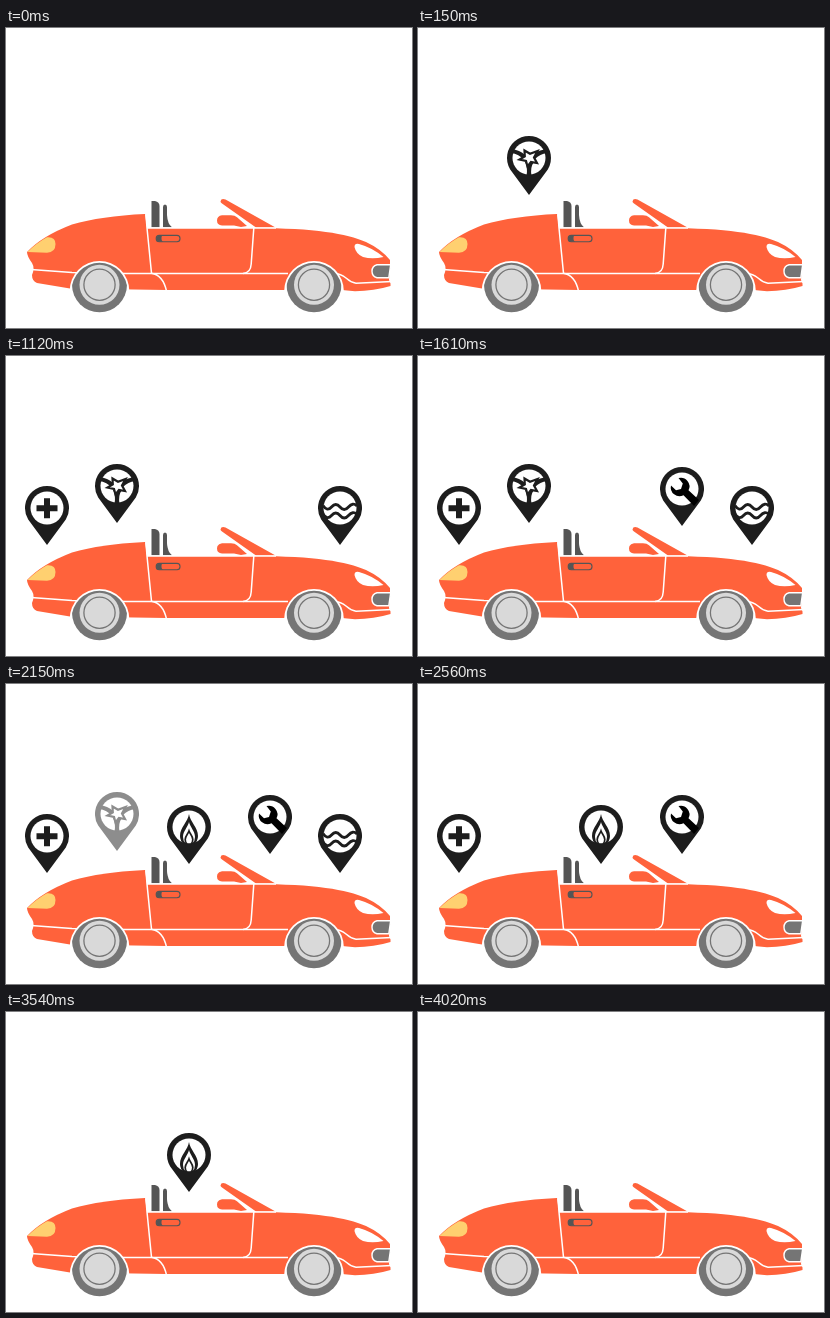
Write an HTML page that moves like this. It is 406x300 px and loops after 4320 ms.

```html
<!DOCTYPE html>
<html lang="en">
<head>
<meta charset="utf-8">
<title>Car with map pins</title>
<style>
  html, body { margin: 0; width: 100%; height: 100%; overflow: hidden; background: #fff; }
  svg { display: block; width: 406px; height: 300px; }
</style>
</head>
<body>
<svg viewBox="0 0 406 300">
  <defs>
    <clipPath id="face"><circle r="18"/></clipPath>
    <clipPath id="arch"><circle cy="6" r="28"/></clipPath>
    <g id="pin">
      <path d="M0 37L-18.8 11.5A22 22 0 1 1 18.8 11.5Z" fill="#1d1d1d"/>
      <circle r="16.5" fill="#fff"/>
    </g>
    <g id="wheel">
      <circle cy="6" r="29.8" fill="#fff"/>
      <circle r="27.5" fill="#757575" clip-path="url(#arch)"/>
      <circle r="20" fill="#d9d9d9"/>
      <circle r="15.6" fill="none" stroke="#757575" stroke-width="1.3"/>
    </g>
  </defs>

  <!-- seats, mirror and windscreen -->
  <g fill="#555">
    <path d="M145.5 173H149Q153.5 174 153.5 178V199.3H145.5Z"/>
    <path d="M157 199.3V179Q157 176.5 159 176.5T161 179V187Q161.5 196 166 199.3Z"/>
  </g>
  <g fill="#ff623b">
    <path d="M216 187.3H225Q229 187.3 231 189.3L241 198L235 199L228 197.5H216Q211 197 211 192.5T216 187.3Z"/>
    <path d="M214.5 173.5Q215 170 219.5 171.5L269.5 199.5H250L216 175.5Q214.5 174.5 214.5 173.5Z"/>
    <!-- body -->
    <path d="M21 224Q36 208 66 196.5Q95 188 139 186L141 200H248C310 200.2 340 205.5 360 214Q375 221 384 232V236L383 252L384.5 255.5V258Q368 263 349 263.3L336 262H160L64 260.5L31 255Q26 253 26 247Q29 240 26 235Q21 228 21 224Z"/>
  </g>

  <!-- panel seams -->
  <g fill="none" stroke="#fff" stroke-width="1.5">
    <path d="M25 241.5L66 244.5L120 245.4H282"/>
    <path d="M140 187L141 200L145.5 245.2Q157 247 160.5 263"/>
    <path d="M141 200H270"/>
    <path d="M247.8 200L245.2 236Q244.7 245 237 245.4"/>
    <path d="M328 245.4Q335 245.5 340 250T350 255.2L386 253.5"/>
  </g>

  <path d="M21.5 224Q31 214.5 41 209.2Q49.5 208.5 49.5 216Q49.5 224.5 41 224.7Z" fill="#ffd070"/>
  <path d="M348.5 219Q348.5 215 353 216Q366 219.5 377.5 229Q366 231.5 357 229Q350 226 348.5 219Z" fill="#fff"/>
  <path d="M371 236.7H384.7L382.8 249.8H371Q366 248.5 366 243.2T371 236.7Z" fill="#757575" stroke="#fff" stroke-width="1.4"/>
  <rect x="150.2" y="207.4" width="23.8" height="6.4" rx="3" fill="#ff623b" stroke="#555" stroke-width="1.1"/>
  <path d="M156 207.4H153Q150.2 208 150.2 210.6T153 213.8H157Q154.5 211.5 156 207.4Z" fill="#555"/>

  <use href="#wheel" x="93.5" y="256.8"/>
  <use href="#wheel" x="308" y="256.8"/>

  <!-- pins -->
  <g id="crash" transform="translate(111 130)">
    <use href="#pin"/>
    <g fill="#1d1d1d" clip-path="url(#face)">
      <path d="M-18 -9Q-9 -8 -4 -3L-5 2Q-10 -4 -18 -5Z"/>
      <path d="M18 -9Q10 -8 4 -4L6 1Q11 -4 18 -5Z"/>
      <path d="M-4 4Q-1 9 -2.5 18H2.5Q1 9 5 4Z"/>
    </g>
    <path d="M-4.5 -7.5L1 -4.2L8.5 -7L5 -.5L8 5L2 4L-1.5 8.5L-3 3L-9.5 1.5L-4.2 -1.5Z"
      fill="#fff" stroke="#1d1d1d" stroke-width="2.2"/>
  </g>
  <g id="water" transform="translate(334 152)">
    <use href="#pin"/>
    <path d="M-17 -2.5q4.2 6.5 8.5 1.5t8.5 0t8.5 0t8.5 -1M-17 6q4.2 6.5 8.5 1.5t8.5 0t8.5 0t8.5 -1"
      fill="none" stroke="#1d1d1d" stroke-width="2.8" clip-path="url(#face)"/>
  </g>
  <g id="medical" transform="translate(41 152)">
    <use href="#pin"/>
    <path d="M-10.5 .3H10.5M0 -9.7V10.3" stroke="#1d1d1d" stroke-width="6"/>
  </g>
  <g id="repair" transform="translate(264 133)">
    <use href="#pin"/>
    <path d="M-3.5 -11A8.7 8.7 0 0 1 6.5 1.3L17 11L12 17L1.5 6.2A8.7 8.7 0 0 1 -11 -3.5L-6 1.2L-1 0L.8 -5.5Z"/>
  </g>
  <g id="fire" transform="translate(183 143)">
    <use href="#pin"/>
    <path d="M0 -13C1 -5 9 0 9 9Q9 14 5 17H-5Q-9 14 -9 9C-9 0 -1 -5 0 -13Z" fill="#1d1d1d"/>
    <path d="M0 -5C1 0 6 4 6 10Q6 14 3.5 16H-3.5Q-6 14 -6 10C-6 4 -1 0 0 -5Z" fill="#fff"/>
    <path d="M0 4C1 7 3.8 9 3.8 12.5Q3.8 15.5 2 17H-2Q-3.8 15.5 -3.8 12.5C-3.8 9 -1 7 0 4Z"
      fill="#fff" stroke="#1d1d1d" stroke-width="1.7"/>
  </g>
</svg>
<script>
  const LOOP = 4320, STEP = 30;

  // Each pin: fade-in start and end, fade-out start and end (ms)
  const fades = {
    crash:   [0, 150, 2060, 2240],
    water:   [450, 630, 2410, 2560],
    medical: [970, 1120, 2900, 3050],
    repair:  [1460, 1610, 3390, 3540],
    fire:    [1850, 2060, 3840, 4020]
  };

  function progress(time, start, end) {
    const stepped = Math.floor((time - start) / STEP + 0.001) * STEP;
    return Math.min(1, Math.max(0, stepped / (end - start)));
  }

  function draw(now) {
    const time = now % LOOP;
    for (const [id, [inStart, inEnd, outStart, outEnd]] of Object.entries(fades)) {
      const opacity = progress(time, inStart, inEnd) - progress(time, outStart, outEnd);
      document.getElementById(id).setAttribute("opacity", opacity);
    }
  }

  const origin = performance.now();
  function tick() {
    draw(performance.now() - origin);
    requestAnimationFrame(tick);
  }
  tick();
</script>
</body>
</html>
```
